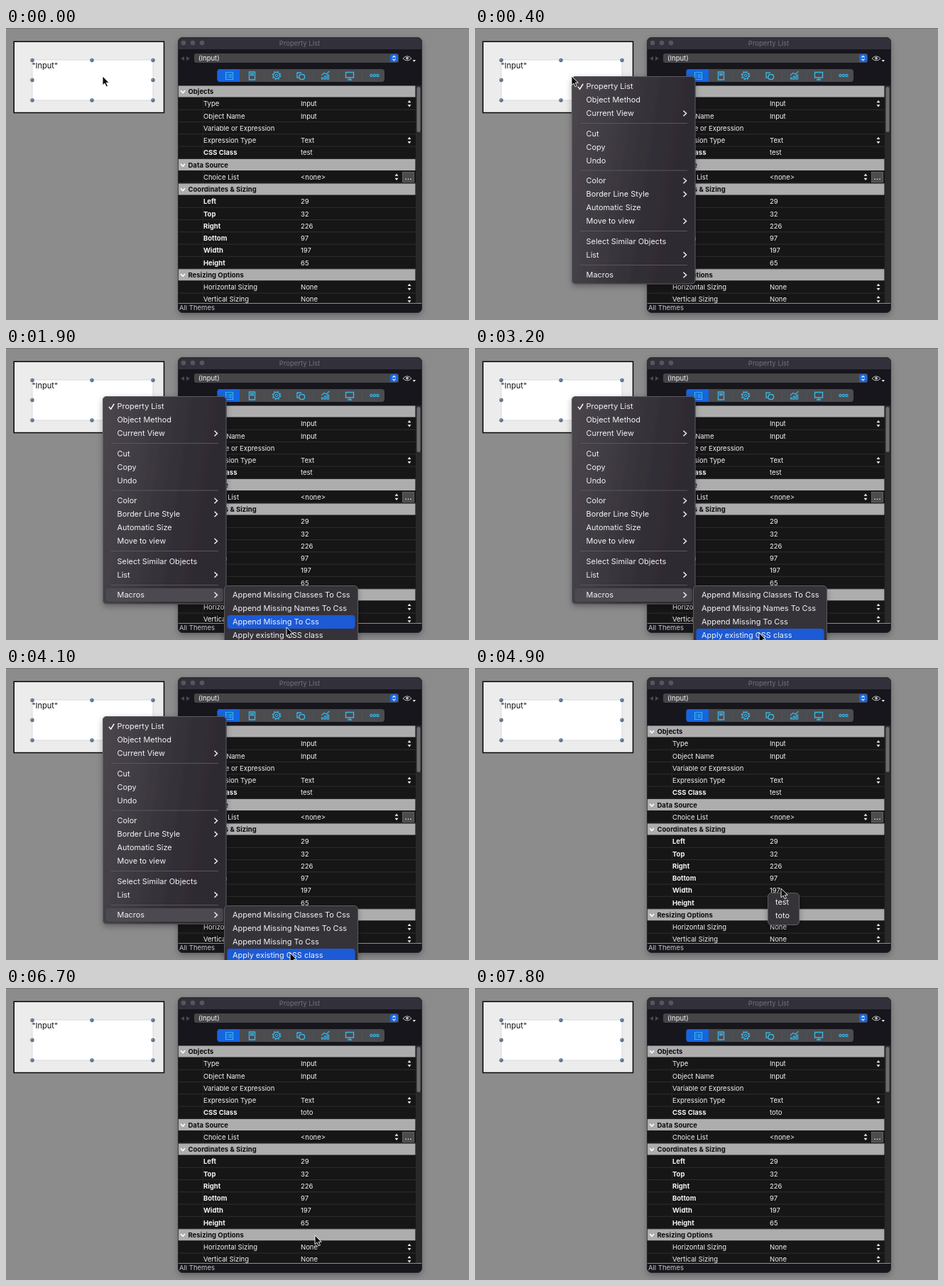
Write an HTML page that moves like this. It is 652 by 412 pixels and loops after 8700 ms.

```html
<!DOCTYPE html>
<html lang="en">
<head>
<meta charset="utf-8">
<title>Property list</title>
<style>
html, body { margin: 0; width: 100%; height: 100%; overflow: hidden; background: #8c8c8c; }
svg { display: block; width: 652px; height: 412px; }
text { font-family: Inter, Roboto, sans-serif; font-size: 9.5px; fill: #f4f4f4; white-space: pre; }
.b { font-weight: 700; }
.m { font-size: 10.95px; fill: #f3f2f4; }
</style>
</head>
<body>
<svg id="stage" viewBox="0 0 652 412" xmlns="http://www.w3.org/2000/svg"></svg>
<script>
const LOOP = 8700, STEP = 100;
const OPEN = 300, SUB = 1300, CLOSE = 4300, POP = 4600, PICK = 6400, HIDE = 7800;
const BLUE = '#1c5ad6', ICON = '#39b4e6';

const rect = (x, y, w, h, fill, more = '') =>
  `<rect x="${x}" y="${y}" width="${w}" height="${h}" fill="${fill}" ${more}/>`;
const text = (x, y, s, cls = '', more = '') =>
  `<text x="${x}" y="${y}" class="${cls}" ${more}>${s.replace(/&/g, '&amp;').replace(/</g, '&lt;')}</text>`;
const line = (d, color, w = 1, more = '') =>
  `<path d="${d}" fill="none" stroke="${color}" stroke-width="${w}" ${more}/>`;
const dot = (x, y, r, fill, more = '') =>
  `<circle cx="${x}" cy="${y}" r="${r}" fill="${fill}" ${more}/>`;
const stepper = (x, y) =>
  `<path d="M${x - 2.5} ${y - 1.5}l2.5 -3.2l2.5 3.2zM${x - 2.5} ${y + 1.5}l2.5 3.2l2.5 -3.2z" fill="#eee"/>`;

function form() {
  let s = rect(0, 0, 652, 412, '#8c8c8c') + rect(0, 0, 652, 1, '#767676');
  s += rect(11.2, 19.2, 211.3, 100.3, '#ececec', 'stroke="#080808" stroke-width="1.5"');
  s += rect(37, 45, 170, 57, '#fff', 'stroke="#d2d2d6" stroke-width=".8"');
  s += text(36.5, 57.4, '"Input"', '', 'style="font-size:11px;fill:#111"');
  for (const y of [45.5, 73.5, 102])
    for (const x of [37, 121, 207])
      if (x !== 121 || y !== 73.5)
        s += dot(x, y, 2.7, '#587089') + dot(x - .6, y - .7, 1, '#8fa5ba');
  return s;
}

function icons() {
  const p = (d, w = 1.4) => line(d, ICON, w);
  return p('M309.5 62.5h10v10h-10zM311 65.5h1M313.5 65.5h4.5M311 67.5h1M313.5 67.5h4.5M311 69.5h1M313.5 69.5h4.5', 1.2) +
    p('M342.5 62h8v11h-8zM344 64.5h5M344 66.5h5') +
    dot(381, 67, 4.3, 'none', `stroke="${ICON}" stroke-width="1.3"`) +
    dot(381, 67, 5.6, 'none', `stroke="${ICON}" stroke-width="1.5" stroke-dasharray="2.2"`) +
    dot(381, 67, 1.7, 'none', `stroke="${ICON}"`) +
    p('M416 63h-6v7h2') + rect(413, 65.5, 7.5, 7, '#48494c', `stroke="${ICON}" stroke-width="1.4" rx="3"`) +
    p('M444.5 73v-3h2v3M448.5 73v-5h2v5M452.5 73v-7h2v7M444 67l4 -3.5l3 1.5l4.5 -4', 1.2) +
    p('M478.5 62.5h11v7.5h-11zM484 70v2.5M481 73h6') +
    [514.5, 519, 523.5].map(x => dot(x, 67, 1.6, 'none', `stroke="${ICON}" stroke-width="1.2"`)).join('');
}

// [label, value, kind]: h = header, b = bold, s = stepper, c = choice button
const ROWS = [
  ['Objects', '', 'h'], ['Type', 'Input', 's'], ['Object Name', 'Input', ''],
  ['Variable or Expression', '', ''], ['Expression Type', 'Text', 's'], ['CSS Class', 'test', 'b'],
  ['Data Source', '', 'h'], ['Choice List', '<none>', 'c'],
  ['Coordinates & Sizing', '', 'h'], ['Left', '29', 'b'], ['Top', '32', 'b'], ['Right', '226', 'b'],
  ['Bottom', '97', 'b'], ['Width', '197', 'b'], ['Height', '65', 'b'],
  ['Resizing Options', '', 'h'], ['Horizontal Sizing', 'None', 's'], ['Vertical Sizing', 'None', 's']
];

function row([label, value, kind], i) {
  const y = 89.5 + 17.25 * i, base = y + 3.5;
  if (kind === 'h')
    return rect(242, y - 8, 334.4, 16, '#adadad') +
      line(`M246 ${y - 1.2}l3 3.2l3 -3.2`, '#fff', 1.6) +
      text(256.5, base, label, 'b', 'style="fill:#0c0c0c"');
  let s = rect(242, y + 8.1, 335, .9, '#303032');
  s += text(278, base, label, kind === 'b' ? 'b' : '');
  s += text(415, base, value, '', label === 'CSS Class' ? 'id="css"' : '');
  if (kind === 's') s += stepper(568, y);
  if (kind === 'c')
    s += stepper(550, y) + rect(558.5, y - 7, 16, 14, '#4c4c4e', 'stroke="#77777a" stroke-width=".7"') +
      [563, 566.5, 570].map(x => dot(x, y + 3, .8, '#fff')).join('');
  return s;
}

function panel() {
  let s = rect(242, 13, 344, 389, '#19191b', 'rx="7" filter="url(#shade)"');
  s += '<path d="M242 30V20a7 7 0 0 1 7 -7H579a7 7 0 0 1 7 7V30z" fill="#32303a"/>';
  s += [250, 263, 276].map(x => dot(x, 21, 4, '#56555b', 'stroke="#26252b" stroke-width=".7"')).join('');
  s += text(413.5, 24.5, 'Property List', '', 'text-anchor="middle" style="fill:#74737b"');
  s += '<path d="M251 40v6l-5 -3zM254 40v6l5 -3z" fill="#4b4b4e"/>';
  s += rect(265, 36, 288, 13, '#454548', 'rx="3"') + text(271, 46, '(Input)');
  s += rect(541, 37, 11, 11, '#1a68e2', 'rx="2.5"');
  s += line('M544.5 41.5l2 -2l2 2M544.5 43.7l2 2l2 -2', '#fff', 1.1);
  s += line('M559 43q6 -6.5 12 0q-6 6 -12 0z', '#bbb') + dot(565, 42.7, 1.9, '#bbb');
  s += '<path d="M572.5 45h4.5l-2.25 3z" fill="#ddd"/>';
  s += rect(297.5, 58, 235.5, 18, '#4b4c4f', 'rx="4"');
  s += '<path d="M329 58H301.5a4 4 0 0 0 -4 4v10a4 4 0 0 0 4 4H329z" fill="#1565df"/>';
  s += [363, 398, 432, 467, 501].map(x => rect(x, 61, .6, 12, '#55565a')).join('') + icons();
  s += '<g clip-path="url(#list)">' + rect(242, 81, 335, 308, '#161617');
  s += rect(277, 81, .7, 308, '#29292b') + ROWS.map(row).join('') + '</g>';
  s += rect(577, 81, 9, 307, '#29292a') + rect(578.5, 83, 5, 64, '#6c6c6e', 'rx="2.5"');
  s += rect(242, 388, 344, 1, '#8d8d8f');
  s += text(244, 398, 'All Themes', '', 'style="fill:#c9c9c9"');
  s += rect(242.5, 13.5, 343, 388, 'none', 'rx="7" stroke="#2a2a2c" stroke-width=".8"');
  return s;
}

const MAIN = [
  ['Property List', 82.5], ['Object Method', 101.5], ['Current View', 120.5, 1],
  ['Cut', 149], ['Copy', 168], ['Undo', 187],
  ['Color', 215.5, 1], ['Border Line Style', 234.5, 1], ['Automatic Size', 253.5], ['Move to view', 272.5, 1],
  ['Select Similar Objects', 301], ['List', 320, 1], ['Macros', 348.5, 1]
];
const MACROS = [
  ['Append Missing Classes To Css', 348.5], ['Append Missing Names To Css', 367.5],
  ['Append Missing To Css', 386.5], ['Apply existing CSS class', 405.5]
];
const CLASSES = [['test', 330.5], ['toto', 349.5]];

const sheet = (x, y, w, h, fill) =>
  rect(x, y, w, h, fill, 'rx="5.5" filter="url(#shade)"') +
  rect(x + .5, y + .5, w - 1, h - 1, 'none', 'rx="5" stroke="#69666c" stroke-width=".8"');

function menu(id, [x, y, w, h], tx, items, fill = '#343038', extra = '') {
  let s = `<g id="${id}">` + sheet(x, y, w, h, fill);
  s += rect(x + 4.5, 0, w - 9, 19, BLUE, `rx="4" id="${id}-bar"`);
  for (const [label, cy, sub] of items) {
    s += text(tx, cy + 3.6, label, 'm');
    if (sub) s += line(`M293.5 ${cy - 3.7}l4 3.7l-4 3.7`, '#eee', 1.5);
  }
  return s + extra + '</g>';
}

const rules = [134.5, 201, 286.5, 334.5].map(y => rect(148, y - .5, 151, 1, '#5a565e')).join('');
const check = line('M145 83l2.6 3.2l4.6 -7.4', '#fff', 1.5);

document.getElementById('stage').innerHTML =
  `<defs><clipPath id="list"><rect x="242" y="81" width="335" height="307"/></clipPath>
  <linearGradient id="glass" x2="1" y2=".25"><stop stop-color="#4a464c"/>
  <stop offset=".3" stop-color="#423e45"/><stop offset=".65" stop-color="#343038"/>
  <stop offset="1" stop-color="#2d2930"/></linearGradient>
  <filter id="shade" x="-20%" y="-20%" width="140%" height="150%">
  <feDropShadow dx="0" dy="3" stdDeviation="4" flood-color="#000" flood-opacity=".3"/></filter></defs>` +
  form() + panel() +
  menu('main', [136, 68, 174.5, 293.5], 156.5, MAIN, 'url(#glass)', rules + check) +
  menu('sub', [307, 335, 189, 100], 319, MACROS) +
  menu('pop', [412, 317, 45, 46], 423, CLASSES) +
  `<path id="arrow" d="M0 0V12.8L3 10L5.1 14.9L7.4 13.9L5.3 9.2H9.3Z"
    fill="#0a0a0a" stroke="#fff" stroke-width=".9" stroke-linejoin="round"/>`;

const el = id => document.getElementById(id);
const show = (id, on) => el(id).setAttribute('visibility', on ? 'visible' : 'hidden');

// pointer stops: time, x, y
const PATH = [
  [0, 136, 68], [400, 136, 68], [1000, 208, 343], [1300, 208, 343], [1600, 318, 349],
  [1900, 395, 394], [2100, 400, 402], [4200, 400, 402], [4600, 412, 317], [4900, 431, 311],
  [5100, 431, 311], [5300, 432, 327], [5600, 433, 331], [5900, 435, 349], [LOOP, 435, 349]
];

function pointer(t) {
  const i = PATH.findIndex(k => k[0] > t);
  const [t0, x0, y0] = PATH[i - 1], [t1, x1, y1] = PATH[i];
  const u = (t - t0) / (t1 - t0), e = u * u * (3 - 2 * u);
  return [x0 + (x1 - x0) * e, y0 + (y1 - y0) * e];
}

function bar(id, items, y, on) {
  const hit = on && items.find(k => Math.abs(k[1] - y) <= 9.5);
  el(id + '-bar').setAttribute('y', hit ? hit[1] - 9.5 : -50);
}

function draw(t) {
  const [x, y] = pointer(t);
  const main = t >= OPEN && t < CLOSE, sub = t >= SUB && t < CLOSE, pop = t >= POP && t < PICK;
  show('main', main);
  show('sub', sub);
  show('pop', pop);
  show('arrow', t < HIDE);
  bar('main', MAIN, sub ? 348.5 : y, main && t > 400);
  el('main-bar').setAttribute('fill', sub ? '#4d4951' : BLUE);
  bar('sub', MACROS, y, sub && x > 309);
  bar('pop', CLASSES, y, pop);
  el('css').textContent = t < PICK + 100 ? 'test' : 'toto';
  el('arrow').setAttribute('transform', `translate(${x} ${y})`);
}

const start = performance.now();
function tick(now) {
  const t = Math.max(0, now - start) % LOOP;
  draw(Math.floor(t / STEP) * STEP);
  requestAnimationFrame(tick);
}
draw(0);
requestAnimationFrame(tick);
</script>
</body>
</html>
```
